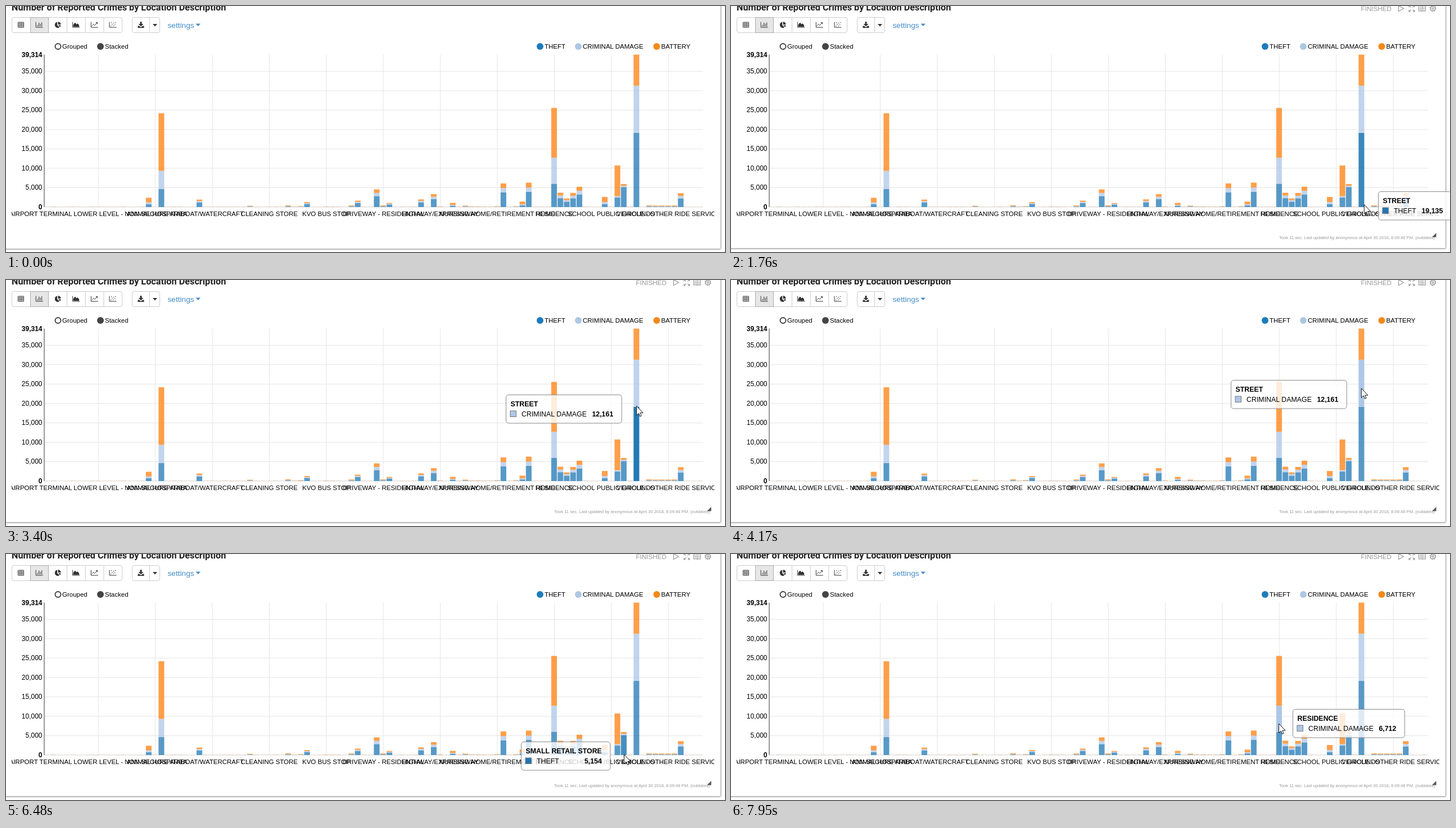
An HTML page for the animation above (8000 ms loop, 1279 by 438 pixels).

```html
<!DOCTYPE html>
<html lang="en">
<head>
<meta charset="utf-8">
<title>Stacked bar chart</title>
<style>
  html, body { margin: 0; width: 100%; height: 100%; overflow: hidden; background: #fff; }
  svg { display: block; width: 1279px; height: 438px; }
  text { font-family: "Liberation Sans", Arial, sans-serif; font-size: 11.5px; fill: #000; white-space: pre; }
  .mid { text-anchor: middle; }
  .end { text-anchor: end; }
  .num { font-size: 12px; }
  .bold { font-weight: bold; }
  .tip text { font-size: 12.4px; }
  .title { font: bold 16.25px Roboto, sans-serif; fill: #212121; }
  .soft { fill: none; stroke: #999; stroke-width: 1.2; }
  .ink { fill: #333; }
  .pen { fill: none; stroke: #333; stroke-width: 1; }
</style>
</head>
<body>
<svg viewBox="0 0 1279 438">
  <defs>
    <filter id="shadow" x="-2%" y="-5%" width="104%" height="110%">
      <feDropShadow dx="1" dy="1" stdDeviation="1.6" flood-color="#000" flood-opacity=".5"/>
    </filter>
    <clipPath id="plot"><rect x="10" y="80" width="1250" height="310"/></clipPath>
  </defs>
  <rect id="card" x="-20" y="-20" width="1290.5" height="451" fill="#fff" filter="url(#shadow)"/>
  <text class="title" x="10" y="8">Number of Reported Crimes by Location Description</text>
  <g id="toolbar"></g>
  <g id="legend"></g>
  <g id="grid"></g>
  <g id="bars"></g>
  <g id="labels" clip-path="url(#plot)"></g>
  <g id="controls">
    <text x="1120.5" y="8.5" style="font-size:11.7px;fill:#999">FINISHED</text>
    <path class="soft" d="M1187.5 -.5L1196.5 4.5L1187.5 9.5Z"/>
    <path class="soft" d="M1206 2V-1H1209M1213 -1H1216V2M1216 7V10H1213M1209 10H1206V7M1206 -1L1209.5 2.5M1216 -1L1212.5 2.5M1216 10L1212.5 6.5M1206 10L1209.5 6.5"/>
    <path class="soft" d="M1223.5 -1H1235.5V9H1223.5ZM1229.5 -1V10M1225 2H1228M1225 4.5H1228M1225 7H1228M1231 2H1234M1231 4.5H1234M1231 7H1234"/>
    <circle class="soft" cx="1248.5" cy="4.5" r="4.2"/>
    <circle class="soft" cx="1248.5" cy="4.5" r="1.7"/>
    <circle class="soft" cx="1248.5" cy="4.5" r="5.2" stroke-dasharray="2 2.08"/>
    <text x="975" y="415" style="font-size:7.62px;fill:#999">Took 11 sec. Last updated by anonymous at April 30 2018, 8:09:46 PM. (outdated)</text>
    <path d="M1247 411.5L1254.5 404V411.5Z" fill="#555"/>
    <path d="M1247 409L1252 404" stroke="#fff"/>
  </g>
  <g id="tip" class="tip">
    <rect id="box" height="50.5" rx="4.5" fill="#fff" fill-opacity=".8" stroke="#8a8a8a"/>
    <text id="head" class="bold" x="8" y="20"></text>
    <rect id="swatch" x="7.5" y="28.5" width="10.5" height="10.5" stroke="#777"/>
    <text id="name" x="27.5" y="38"></text>
    <text id="value" class="bold end" y="38"></text>
  </g>
  <path id="cursor" d="M0 0V16.5L3.8 13L6.2 18.6L8.7 17.5L6.3 12.2H11.6Z" fill="#fff" stroke="#111" stroke-linejoin="round"/>
</svg>
<script>
const $ = id => document.getElementById(id);
const LOOP = 8000, STEP = 11.267, FIRST = 73.6, BASE = 358, TOP = 86.5, LEFT = 68, RIGHT = 1240;
const BAR = STEP * 0.9;
const SERIES = [
  { name: "THEFT", fill: "#1f77b4", dot: "#1c7cbc", x: 950 },
  { name: "CRIMINAL DAMAGE", fill: "#aec7e8", dot: "#aec7e3", x: 1018 },
  { name: "BATTERY", fill: "#ff7f0e", dot: "#f28919", x: 1157.5 }
];
const PLACES = { 80: "RESIDENCE", 90: "SIDEWALK", 91: "SMALL RETAIL STORE", 93: "STREET" };

// bars that stand out: one count per series, or a total split by a shared mix
const PEAKS = {
  18: [4630, 4710, 14840], 80: [6010, 6712, 12838], 90: [2450, 350, 7920],
  91: [5154, 341, 445], 93: [19135, 12161, 8018]
};
const THEFT_LED = { 24: 1930, 41: 1300, 49: 1660, 52: 4560, 54: 1060, 59: 1980, 61: 3330, 72: 6100,
  76: 6300, 81: 3700, 82: 2230, 83: 3650, 84: 5250, 100: 3580 };
const BATTERY_LED = { 16: 2400, 64: 1080, 75: 1400, 88: 2600 };

let seed = 7;
const random = () => (seed = seed * 16807 % 2147483647) / 2147483647;
const split = (total, mix) => mix.map(m => m * total);
const counts = Array.from({ length: 104 }, (_, i) => {
  const small = 40 + (i < 30 ? 60 : 500) * random() ** 3;
  if (PEAKS[i]) return PEAKS[i];
  if (THEFT_LED[i]) return split(THEFT_LED[i], [0.62, 0.18, 0.2]);
  return split(BATTERY_LED[i] || small, [0.3, 0.2, 0.5]);
});

const yOf = v => BASE - v * (BASE - TOP) / 39314;
const centre = i => FIRST + i * STEP;
const fmt = n => Math.round(n).toLocaleString("en-US");
const text = (x, y, s, cls = "") => `<text x="${x}" y="${y}" class="${cls}">${s}</text>`;
const line = (x1, y1, x2, y2, stroke) => `<path d="M${x1} ${y1}L${x2} ${y2}" stroke="${stroke}"/>`;

const TICKS = ["AIRPORT TERMINAL LOWER LEVEL - NON-SECURE AREA", "ANIMAL HOSPITAL", "BOAT/WATERCRAFT",
  "CLEANING STORE", "KVO BUS STOP", "DRIVEWAY - RESIDENTIAL", "HIGHWAY/EXPRESSWAY",
  "NURSING HOME/RETIREMENT HOME", "RESIDENCE", "SCHOOL PUBLIC GROUNDS", "VEHICLE - OTHER RIDE SERVICE"];

function drawAxes() {
  let grid = "", labels = "";
  for (let v = 0; v <= 35000; v += 5000) {
    const y = yOf(v);
    grid += line(LEFT, y, RIGHT, y, "#e5e5e5") + text(64.5, y + 4, fmt(v), v ? "num end" : "num end bold");
  }
  grid += text(64.5, TOP + 4, "39,314", "num end bold");
  TICKS.forEach((s, k) => {
    const x = centre(8 + 9 * k) + 0.4;
    grid += line(x, TOP, x, BASE, "#e5e5e5");
    labels += text(x, 373.5, s, "mid");
  });
  $("grid").innerHTML = grid + line(LEFT, TOP, LEFT, BASE, "#333");
  $("labels").innerHTML = labels;
}

const segments = [];
function drawBars() {
  let out = "";
  counts.forEach((values, i) => {
    let sum = 0;
    values.forEach((v, s) => {
      const x = centre(i) - BAR / 2, bottom = yOf(sum), top = yOf(sum += v);
      out += `<rect x="${x}" y="${top}" width="${BAR}" height="${bottom - top}" fill="${SERIES[s].fill}" fill-opacity=".75"/>`;
      segments.push({ x, top, bottom, v, series: SERIES[s], place: PLACES[i] });
    });
  });
  $("bars").innerHTML = out;
  [...$("bars").children].forEach((el, k) => segments[k].el = el);
}

function drawLegend() {
  $("legend").innerHTML =
    `<circle cx="92.5" cy="72" r="5" fill="#fff" stroke="#444" stroke-width="2"/>` + text(100, 76, "Grouped") +
    `<circle cx="168" cy="72" r="6" fill="#444"/>` + text(176, 76, "Stacked") +
    SERIES.map(s => `<circle cx="${s.x}" cy="72" r="6" fill="${s.dot}"/>` + text(s.x + 8, 76, s.name)).join("");
}

function drawToolbar() {
  const frame = (x, w) => `<rect x="${x}" y="20.5" width="${w}" height="27" rx="3.5" fill="#fff" stroke="#ccc"/>`;
  const axes = `<path class="pen" d="M-6 -5V4.5H6.5"/>`;
  const icons = [
    `<path class="pen" d="M-5 -4.5H5V4.5H-5ZM-5 -1.5H5M-5 1.5H5M-1.7 -4.5V4.5M1.7 -4.5V4.5"/>`,
    axes + `<path class="pen" d="M-3 3V0M-.5 3V-4M2 3V-2M4.5 3V-4.5"/>`,
    `<path class="ink" d="M-.8 .5V-5.3A5.4 5.4 0 1 0 3.2 4.5ZM.7 -.5V-5.5A5 5 0 0 1 5.7 -.5ZM1 .8H5.7A5 5 0 0 1 4.2 4Z"/>`,
    axes + `<path class="ink" d="M-5 3.5V0L-2 -4L1 -1L3 -2.5L5.5 1V3.5Z"/>`,
    axes + `<path class="pen" d="M-4.5 2L-1.5 -1L.5 1L5 -3.8M2.5 -4H5.2V-1.3"/>`,
    axes + `<path class="pen" d="M-4 2h1.4M-2 -1h1.4M0 1.5h1.4M1 -3h1.4M3 0h1.4M4 -4h1.4M-3 -4h1.4"/>`
  ];
  let out = frame(10.5, 196) + `<rect x="43.5" y="20.5" width="32" height="27" fill="#e6e6e6" stroke="#adadad"/>`;
  for (let x = 108.5; x < 180; x += 32.7) out += line(x, 20.5, x, 47.5, "#ccc");
  icons.forEach((s, k) => out += `<g transform="translate(${26.5 + 32.7 * k} 33.5)">${s}</g>`);
  out += frame(224.5, 49) + line(255.5, 20.5, 255.5, 47.5, "#ccc") +
    `<path class="ink" d="M238.5 28H241.5V32H244.5L240 36.3L235.5 32H238.5ZM234.5 35.5H237L240 38L243 35.5H245.5V39H234.5Z"/>` +
    `<path class="ink" d="M261 32H269L265 36.5Z"/>` +
    `<text x="287.5" y="38.5" style="font-size:13.7px;fill:#428bca">settings</text>` +
    `<path d="M337.5 31.5H346L341.7 36Z" fill="#428bca"/>`;
  $("toolbar").innerHTML = out;
}

// pointer moves: start, end, destination
const MOVES = [
  [620, 1130, 1135, 396], [1320, 1930, 1125, 350], [2490, 2750, 1122, 287], [3040, 3690, 1121, 209],
  [4100, 4780, 1120, 128], [5740, 6290, 1117, 395], [6290, 6480, 1099, 357], [6600, 6740, 1103, 321],
  [6740, 7000, 1088, 322], [7000, 7430, 979, 313], [7450, 7950, 974, 302]
];
const easeOut = u => 1 - (1 - u) ** 2;

function pointer(t) {
  if (t < MOVES[0][0]) return null;
  let x = 1160, y = 438;
  for (const [start, end, toX, toY] of MOVES) {
    if (t < start) break;
    const f = easeOut(Math.min(1, (t - start) / (end - start)));
    x += (toX - x) * f;
    y += (toY - y) * f;
  }
  return [x, y];
}
function hit(t) {
  const p = pointer(t);
  return p && targets.find(s => p[0] >= s.x && p[0] <= s.x + BAR && p[1] >= s.top && p[1] < s.bottom);
}

const width = id => $(id).getComputedTextLength();
function placeTip(seg, t) {
  $("tip").style.display = seg ? "" : "none";
  if (!seg) return;
  $("head").textContent = seg.place;
  $("name").textContent = seg.series.name;
  $("value").textContent = fmt(seg.v);
  $("swatch").setAttribute("fill", seg.series.fill);
  const w = Math.max(23 + width("head"), 52 + width("name") + width("value"));
  const [x, y] = pointer(t - 50) || pointer(t);
  // wide tips flip to the left near the right edge
  const left = x > 1100 && w > 134 ? x - 26 - w : x + 24.5;
  $("box").setAttribute("width", w);
  $("value").setAttribute("x", w - 15);
  $("tip").setAttribute("transform", `translate(${Math.round(left) + 0.5} ${Math.round(y - 26) + 0.5})`);
}

function render(t) {
  const shown = Math.min(1, Math.max(0, (t - 670) / 120));
  $("controls").setAttribute("opacity", shown);
  $("card").setAttribute("height", 452 - shown);

  // highlight ramps linearly over 150 ms of hovering
  const heat = new Map();
  for (let k = 0; k < 10; k++) {
    const s = hit(t - k * 15);
    if (s) heat.set(s, (heat.get(s) || 0) + 0.1);
  }
  targets.forEach(s => s.el.setAttribute("fill-opacity", 0.75 + 0.25 * (heat.get(s) || 0)));
  placeTip(hit(t) || hit(t - 70) || hit(t - 140), t);

  const p = pointer(t);
  $("cursor").style.display = p ? "" : "none";
  if (p) $("cursor").setAttribute("transform", `translate(${p[0] + 0.5} ${p[1]})`);
}

drawAxes();
drawBars();
drawLegend();
drawToolbar();
const targets = segments.filter(s => s.place);
const start = performance.now();
function tick() {
  render((performance.now() - start) % LOOP);
  requestAnimationFrame(tick);
}
tick();
</script>
</body>
</html>
```
